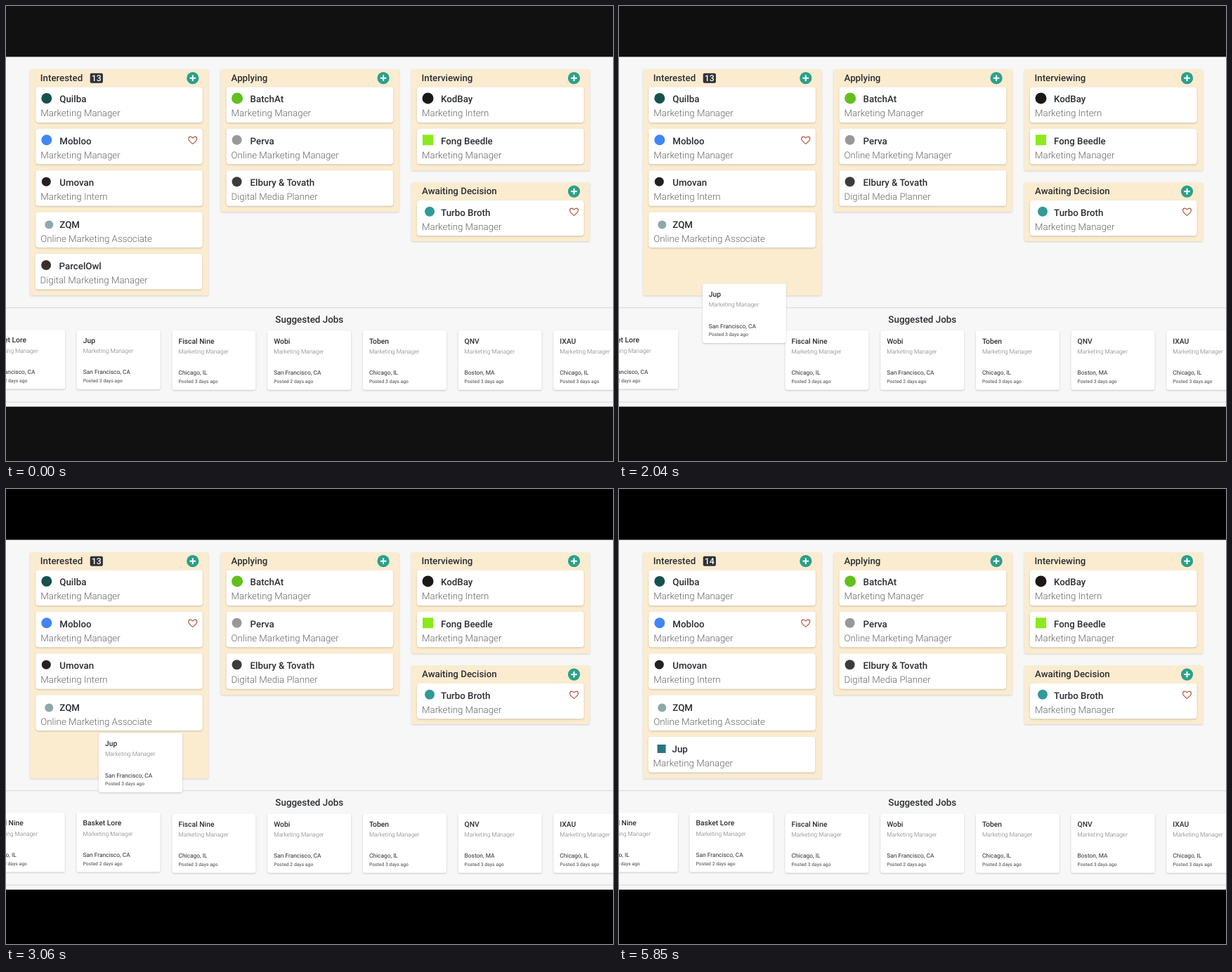
Write an HTML page with a canvas that moves like this. It is 864 px wide and 648 px high and loops after 5880 ms.

```html
<!DOCTYPE html>
<html lang="en">
<head>
<meta charset="utf-8">
<title>Job board</title>
<style>
html, body { margin: 0; width: 100%; height: 100%; overflow: hidden; background: #000; }
canvas { display: block; }
</style>
</head>
<body>
<canvas id="stage" width="864" height="648"></canvas>
<script>
const ctx = document.getElementById('stage').getContext('2d');
const LOOP = 5880;
const INK = '#2b2d33', GREY = '#757575', TEAL = '#2aa08d';
const start = performance.now();

const clamp = v => Math.max(0, Math.min(1, v));
const span = (t, a, b) => clamp((t - a) / (b - a));
const quad = p => p < .5 ? 2 * p * p : 1 - 2 * (1 - p) ** 2;
const cubic = p => p < .5 ? 4 * p ** 3 : 1 - 4 * (1 - p) ** 3;
const mix = (a, b, p) => a + (b - a) * p;

function text(str, x, y, size, weight, color, align = 'left') {
  ctx.font = `${weight} ${size}px Roboto, sans-serif`;
  ctx.textAlign = align;
  ctx.fillStyle = color;
  ctx.fillText(str, x, y);
}

function panel(x, y, w, h, r, color, shadow = 0) {
  ctx.save();
  if (shadow) {
    ctx.shadowColor = `rgba(0,0,0,${shadow})`;
    ctx.shadowBlur = 2.5;
    ctx.shadowOffsetY = 1;
  }
  ctx.fillStyle = color;
  ctx.beginPath();
  ctx.roundRect(x, y, w, h, r);
  ctx.fill();
  ctx.restore();
}

function disc(x, y, r, color) {
  ctx.fillStyle = color;
  ctx.beginPath();
  ctx.arc(x, y, r, 0, Math.PI * 2);
  ctx.fill();
}

function plus(x, y) {
  disc(x, y, 8.6, TEAL);
  ctx.fillStyle = '#fff';
  ctx.fillRect(x - 4.3, y - 1, 8.6, 2);
  ctx.fillRect(x - 1, y - 4.3, 2, 8.6);
}

function heart(x, y) {
  ctx.strokeStyle = '#b9583f';
  ctx.lineWidth = 1.2;
  ctx.lineJoin = 'round';
  ctx.beginPath();
  for (const s of [-1, 1]) {
    ctx.moveTo(x, y + 5.2);
    ctx.bezierCurveTo(x + s * 3.8, y + 1.8, x + s * 6, y + .4, x + s * 6, y - 2);
    ctx.bezierCurveTo(x + s * 6, y - 5.9, x + s * 1.5, y - 6.2, x, y - 3);
  }
  ctx.stroke();
}

function jobCard(x, y, job) {
  panel(x, y, 237.5, 50.5, 4, '#fff', .2);
  const { name, role, color, r = 7.5, dx = 15.5, dy = 16, square, liked } = job;
  if (square) panel(x + dx - r, y + dy - r, 2 * r, 2 * r, 0, color);
  else disc(x + dx, y + dy, r, color);
  text(name, x + 34, y + 22, 13.3, 500, INK);
  text(role, x + 7, y + 42, 13.3, 300, '#666');
  if (liked) heart(x + 223.5, y + 16.5);
}

function column(x, y, h, title, jobs, titleX = 15) {
  panel(x, y, 254, h, 2, '#fbecd0', .16);
  text(title, x + titleX, y + 16.7, 13.3, 500, INK);
  plus(x + 231.5, y + 12.5);
  jobs.forEach((job, i) => jobCard(x + 8, y + 25.2 + i * 59.4, job));
}

function miniCard(x, y, [name, city, days]) {
  panel(x, y, 119, 84.5, 3, '#fff', .2);
  text(name, x + 9, y + 18.3, 10.3, 500, INK);
  text('Marketing Manager', x + 9, y + 32.6, 8.4, 300, GREY);
  text(city, x + 9, y + 63, 8.4, 400, INK);
  text(`Posted ${days} days ago`, x + 9, y + 74.8, 6.8, 500, '#6a6a6a');
}

const MM = 'Marketing Manager';
const interested = [
  { name: 'Quilba', role: MM, color: '#17514d' },
  { name: 'Mobloo', role: MM, color: '#4285f4', liked: true },
  { name: 'Umovan', role: 'Marketing Intern', color: '#222', r: 6.5, dx: 15 },
  { name: 'ZQM', role: 'Online Marketing Associate', color: '#8fa9aa', r: 6, dx: 19, dy: 18 }
];
const leaving = { name: 'ParcelOwl', role: 'Digital Marketing Manager', color: '#3a302c', r: 7 };
const added = { name: 'Jup', role: MM, color: '#2c7480', r: 6, dx: 19, dy: 17, square: true };
const applying = [
  { name: 'BatchAt', role: MM, color: '#62c01c', r: 8 },
  { name: 'Perva', role: 'Online Marketing Manager', color: '#989898', r: 7, dx: 15 },
  { name: 'Elbury & Tovath', role: 'Digital Media Planner', color: '#3c3c3c', r: 7, dx: 15 }
];
const interviewing = [
  { name: 'KodBay', role: 'Marketing Intern', color: '#1b1817', r: 8 },
  { name: 'Fong Beedle', role: MM, color: '#8bea1c', square: true }
];
const awaiting = [{ name: 'Turbo Broth', role: MM, color: '#2f9a97', r: 7, dx: 18, liked: true }];

const fiscal = ['Fiscal Nine', 'Chicago, IL', 3];
const basket = ['Basket Lore', 'San Francisco, CA', 2];
const dragged = ['Jup', 'San Francisco, CA', 3];
const suggested = [
  fiscal,
  ['Wobi', 'San Francisco, CA', 2],
  ['Toben', 'Chicago, IL', 3],
  ['QNV', 'Boston, MA', 3],
  ['IXAU', 'Chicago, IL', 3]
];

function fade(alpha, draw) {
  if (alpha <= 0) return;
  ctx.globalAlpha = alpha;
  draw();
  ctx.globalAlpha = 1;
}

function render(t) {
  const drag = quad(span(t, 1500, 2500));
  const slide = cubic(span(t, 2550, 3010));
  const drop = span(t, 3080, 3480);
  const bar = Math.round(mix(17, 0, span(t, 1980, 2430)));

  ctx.textRendering = 'geometricPrecision';
  ctx.fillStyle = `rgb(${bar},${bar},${bar})`;
  ctx.fillRect(0, 0, 864, 648);
  ctx.fillStyle = '#f7f7f7';
  ctx.fillRect(0, 72.4, 864, 498.2);
  ctx.fillStyle = '#dcdcdc';
  ctx.fillRect(0, 429, 864, 1.2);
  ctx.fillRect(0, 563.6, 864, 1.2);

  column(34.3, 90.2, 322, 'Interested', interested, 14.5);
  panel(119.7, 95.7, 18.2, 14, 2, '#2f3136');
  text(drop < .5 ? '13' : '14', 128.8, 107, 12.3, 500, '#fff', 'center');
  fade(1 - span(t, 1550, 1850), () => jobCard(41.6, 353, leaving));
  fade(drop, () => jobCard(41.6, 353, added));

  column(305.6, 90.2, 203, 'Applying', applying);
  column(577, 90.2, 144, 'Interviewing', interviewing, 14.5);
  column(577, 251.6, 83.5, 'Awaiting Decision', awaiting);

  text('Suggested Jobs', 431.8, 450.6, 13.4, 500, INK, 'center');
  miniCard(mix(-170.5, -35.2, slide), 461, fiscal);
  miniCard(mix(-34.7, 100.5, slide), 461, basket);
  suggested.forEach((job, i) => miniCard(236.5 + i * 135.7, 462.3, job));
  fade(1 - drop, () => miniCard(mix(100.7, 132, drag), mix(461.4, 347.6, drag), dragged));
}

function tick(now) {
  render(Math.max(0, now - start) % LOOP);
  requestAnimationFrame(tick);
}
render(0);
requestAnimationFrame(tick);
</script>
</body>
</html>
```
